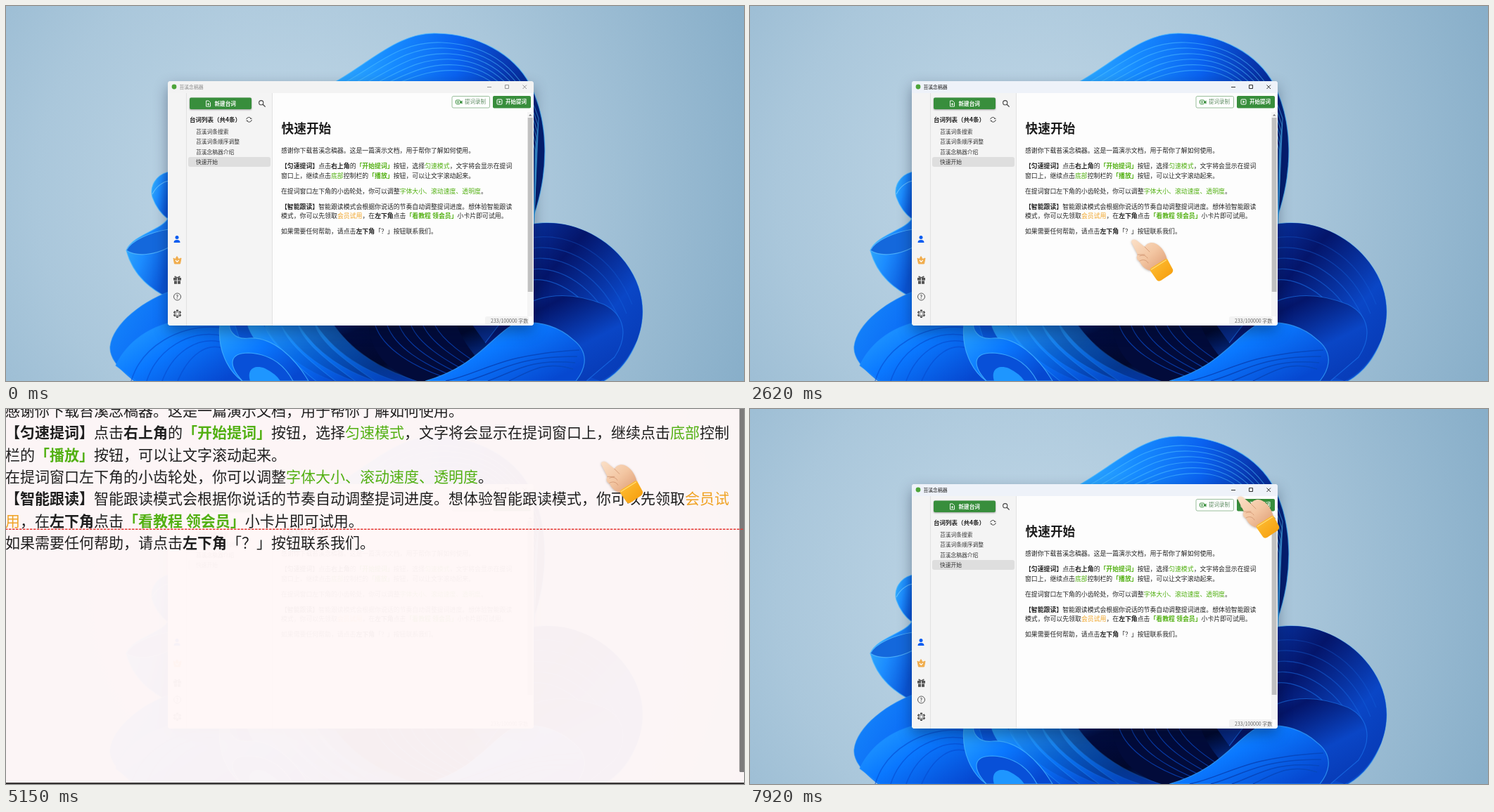
Animation, 1049 px wide and 534 px high, one loop 8000 ms. Source, as an HTML page:

```html
<!DOCTYPE html>
<html lang="zh-CN">
<head>
<meta charset="utf-8">
<title>念稿演示</title>
<style>
html, body { margin: 0; width: 100%; height: 100%; overflow: hidden; background: #a9c5d9; }
svg { display: block; }
text { font-family: "Noto Sans CJK SC", "Noto Sans CJK", "Noto Sans", sans-serif; text-spacing-trim: space-all; }
.b { font-weight: 700; }
.g { fill: #52b012; }
.G { fill: #52b012; font-weight: 700; }
.o { fill: #f0a324; }
.line { fill: none; stroke: #555; stroke-width: 1; }
</style>
</head>
<body>
<svg id="stage" width="1049" height="534" viewBox="0 0 1049 534"></svg>
<script>
const LOOP = 8000;
const GREEN = '#388e3c';

// ---------- drawing helpers ----------
const rect = (x, y, w, h, fill, more = '') =>
  `<rect x="${x}" y="${y}" width="${w}" height="${h}" fill="${fill}" ${more}/>`;
const path = (d, fill, more = '') => `<path d="${d}" fill="${fill}" ${more}/>`;
const line = (d, color = '#555', width = 1, more = '') =>
  path(d, 'none', `stroke="${color}" stroke-width="${width}" ${more}`);
const circle = (x, y, r, fill, more = '') => `<circle cx="${x}" cy="${y}" r="${r}" fill="${fill}" ${more}/>`;
const group = (id, body, more = '') => `<g id="${id}" ${more}>${body}</g>`;
const at = (x, y, body) => `<g transform="translate(${x} ${y})">${body}</g>`;

// y is the middle of the glyphs; b<..> g<..> G<..> o<..> mark styled runs
function text(x, y, size, str, fill = '#222', more = '') {
  const runs = str.replace(/([bgGo])<([^>]*)>/g, '<tspan class="$1">$2</tspan>');
  return `<text x="${x}" y="${y + size * .38}" font-size="${size}" fill="${fill}" ${more}>${runs}</text>`;
}
function grad(id, x2, y2, ...colors) {
  const stops = colors.map((c, i) =>
    `<stop offset="${i / (colors.length - 1)}" stop-color="${c}"/>`).join('');
  return `<linearGradient id="${id}" x1="0" y1="0" x2="${x2}" y2="${y2}">${stops}</linearGradient>`;
}
const repeat = (n, fn) => Array.from({ length: n }, (_, i) => fn(i)).join('');

// ---------- backdrop: soft blue ribbons ----------
const defs = `<defs>
  <radialGradient id="sky" gradientUnits="userSpaceOnUse" cx="400" cy="270" r="720">
    <stop offset="0" stop-color="#c3d9e8"/><stop offset=".5" stop-color="#aac7db"/><stop offset="1" stop-color="#86adc8"/>
  </radialGradient>
  ${grad('top', 1, .45, '#3cbcff', '#168aff', '#0a62f0', '#0836ae', '#051e70')}
  ${grad('leaf', 1, .6, '#38b4f8', '#1c8cff', '#0a56d8')}
  ${grad('base', 1, .2, '#1d9cff', '#0a68f5', '#0846c0', '#06206e', '#0a48c8')}
  ${grad('lobe', 1, 1, '#0a3fb8', '#04156a', '#0a46c6', '#0636b0')}
  ${grad('band', 1, .7, '#2aa6ff', '#0a78ff', '#0648d0')}
  ${grad('deep', 1, .6, '#0648c8', '#020c40', '#01082c', '#0538a8')}
  ${grad('skin', 1, 1, '#fbe0c8', '#f3c6a2', '#dc9870')}
  ${grad('cuff', 1, 1, '#ffc23a', '#f59a08')}
  <clipPath id="inner"><rect x="239" y="109" width="508" height="343"/></clipPath>
  <clipPath id="frame"><rect x="230" y="107" width="520" height="348" rx="4"/></clipPath>
</defs>`;

const rim = (c = '#49b9ff', o = .7) => `stroke="${c}" stroke-opacity="${o}" stroke-width="1.2"`;

const backdrop = rect(0, 0, 1049, 534, 'url(#sky)')
  + path('M468 108C520 78 560 37 612 39C670 40 722 68 745 112C772 165 772 235 750 300L480 320Z', 'url(#top)', rim())
  + repeat(6, i => path(`M${476 + 15 * i} 112C${525 + 11 * i} ${86 + 3 * i} ${560 + 9 * i} ${49 + 8 * i} ${620 + 5 * i} ${52 + 8 * i}`
      + `C690 ${55 + 8 * i} 735 ${92 + 9 * i} ${757 - i} ${160 + 9 * i}L750 320L480 320Z`, 'url(#top)', rim('#4fc0ff', .55)))
  + path('M231 236C212 241 204 258 208 272C214 289 224 299 231 304Z', 'url(#leaf)', rim())
  + path('M208 268C214 256 224 250 231 249', 'none', rim('#7ccfff'))
  + path('M231 300C226 318 180 325 171 348C181 386 208 404 231 416Z', 'url(#leaf)', rim())
  + path('M171 348C186 358 212 354 231 344V318C205 322 178 334 171 348Z', '#1468dc', rim('#62c4ff'))
  + path('M182 534C158 515 147 500 148 485C152 452 196 418 240 404L740 312C795 300 850 325 880 365C908 402 910 442 897 476C886 505 868 524 850 534Z', 'url(#base)', rim('#2b94f5', .6))
  + path('M745 312C795 300 850 325 880 365C908 402 910 442 897 476C880 512 860 526 845 534L700 480Z', 'url(#lobe)')
  + repeat(5, i => line(`M748 ${330 + 15 * i}C${800 - 5 * i} ${322 + 16 * i} ${862 - 8 * i} ${352 + 15 * i} ${890 - 8 * i} ${425 + 13 * i}`, '#1768e0', 1.3, `opacity="${.3 + .09 * i}"`))
  + path('M700 455C745 405 800 405 850 425C880 440 885 470 865 500L825 534H640Z', 'url(#lobe)', rim('#1d78f0', .6))
  + path('M156 512C175 470 230 430 325 452L350 534H185Z', 'url(#band)', rim('#1c8fff', .5))
  + repeat(4, i => line(`M${178 + 22 * i} 534C${192 + 22 * i} ${486 + 5 * i} ${245 + 14 * i} ${452 + 6 * i} ${306 + 5 * i} ${458 + 12 * i}`, '#064bd0', 1.5, 'opacity=".6"'))
  + path('M370 450H660L720 534H400Z', 'url(#deep)')
  + repeat(5, i => path(`M${365 + 25 * i} 453C${390 + 26 * i} 495 ${425 + 28 * i} 520 ${470 + 30 * i} 536H${415 + 28 * i}C${385 + 26 * i} 510 ${350 + 24 * i} 480 ${343 + 24 * i} 453Z`, 'url(#band)', rim('#2fa0ff', .45) + ` opacity="${1 - .12 * i}"`))
  + path('M515 453C518 495 545 522 585 534H700C670 505 650 480 640 453Z', '#020b3a')
  + repeat(6, i => line(`M${525 + 17 * i} 455C${535 + 17 * i} ${485 - 2 * i} ${575 + 14 * i} ${515 - 4 * i} ${640 + 14 * i} 534`, '#0a48c4', 1.2, 'opacity=".75"'))
  + path('M596 534C668 514 690 470 722 453C760 445 790 460 806 475C828 492 826 514 810 534Z', 'url(#band)', rim('#3aa8ff', .7))
  + repeat(4, i => line(`M${625 + 30 * i} 534C${680 + 22 * i} ${522 - i} ${700 + 22 * i} ${496 + 3 * i} ${815 - 3 * i} ${490 + 9 * i}`, '#0648c0', 1.5))
  + path('M304 453C300 490 316 520 336 534H430C410 500 378 470 345 473C322 476 316 458 318 453Z', 'url(#band)', rim('#45b4ff', .8))
  + path('M336 534C316 512 316 494 345 494C380 496 398 515 408 534Z', '#0850d8', rim('#45b4ff', .8))
  + path('M347 534C342 518 352 510 368 516Q384 524 390 534Z', '#1e96ff');

// ---------- main window ----------
const gear = (x, y, r, color, hole) => at(x, y,
  repeat(6, i => `<rect x="${-r * .25}" y="${-r}" width="${r * .5}" height="${2 * r}" fill="${color}" transform="rotate(${i * 60})"/>`)
  + circle(0, 0, r * .74, color) + circle(0, 0, r * .36, hole));

const titleBar = (bg, ink, id) => group(id,
  path('M230 124V111Q230 107 234 107H746Q750 107 750 111V124Z', bg)
  + circle(239, 115, 3.4, '#4ea53a')
  + text(246.5, 115, 6.8, '苔溪念稿器', ink)
  + line('M684 115.500H690M709.500 112.500h5v5h-5zM734.500 112.500l5.500 5.500m0-5.500l-5.500 5.500', ink, .9));

const sideIcons = circle(243, 329.500, 2.500, '#0b5cf0') + path('M238.500 337Q238.500 333 243 333T247.500 337Z', '#0b5cf0')
  + path('M238 359L240.500 360.500L243 356.500L245.500 360.500L249 359L247.500 367H239.500Z', '#f0ad4e', 'stroke="#f0ad4e" stroke-linejoin="round"')
  + line('M241 362l2.300 2.300l2.300-2.300', '#fff', 1.2)
  + rect(238, 387, 11, 3.6, '#555') + rect(239, 391.400, 9, 4.400, '#555')
  + line('M243.500 387v9', '#f3f3f3') + line('M243.500 387c-5-4-4-1-2-.3m2 .3c5-4 4-1 2-.3', '#555', 1.1)
  + circle(243.500, 414, 5, 'none', 'stroke="#555"') + text(241.600, 414, 7, '?', '#555', 'class="b"')
  + gear(243.500, 438.300, 5.600, '#555', '#f3f3f3') + circle(243.500, 438.300, 3.100, 'none', 'stroke="#f3f3f3" stroke-width=".9"');

const names = ['苔溪词条搜索', '苔溪词条顺序调整', '苔溪念稿器介绍', '快速开始'];
const article = [
  [206, '感谢你下载苔溪念稿器。这是一篇演示文档，用于帮你了解如何使用。'],
  [228, 'b<【匀速提词】>点击b<右上角>的G<「开始提词」>按钮，选择g<匀速模式>，文字将会显示在提词'],
  [241.300, '窗口上，继续点击g<底部>控制栏的G<「播放」>按钮，可以让文字滚动起来。'],
  [263.500, '在提词窗口左下角的小齿轮处，你可以调整g<字体大小、滚动速度、透明度>。'],
  [285.500, 'b<【智能跟读】>智能跟读模式会根据你说话的节奏自动调整提词进度。想体验智能跟读'],
  [298.800, '模式，你可以先领取o<会员试用>，在b<左下角>点击G<「看教程 领会员」>小卡片即可试用。'],
  [321, '如果需要任何帮助，请点击b<左下角>「？」按钮联系我们。']
];

const mainWindow =
  rect(230, 107, 520, 348, '#f3f3f3', 'rx="4" style="filter:drop-shadow(0 8px 10px rgba(0,10,40,.38))"')
  + `<g clip-path="url(#frame)">`
  + rect(230, 124, 148, 331, '#f4f4f4') + rect(378, 124, 372, 331, '#fdfdfd')
  + line('M256.500 124V455M378.500 124V455', '#e2e2e2')
  + '</g>'
  + titleBar('#f3f3f3', '#8a8a8a', 'idle') + titleBar('#eef2f9', '#1a1a1a', 'active')
  + sideIcons
  + rect(261, 130.500, 88, 16.500, GREEN, 'rx="2" style="filter:drop-shadow(0 1px 1px rgba(0,0,0,.35))"')
  + line('M284.500 135h3.500l2.500 2.500v5.500h-6zM287.500 138v3.600M285.700 139.800h3.600', '#fff', .9)
  + text(296.500, 138.700, 7.600, '新建台词', '#fff', 'class="b"')
  + circle(362.700, 137.700, 3.100, 'none', 'stroke="#444" stroke-width="1.1"') + line('M365 140l3.600 3.600', '#444', 1.3)
  + text(261, 161.500, 8.500, '台词列表（共4条）', '#222', 'class="b"')
  + line('M341.700 161.500a3.600 3.600 0 0 1 6.500-1.500M349.300 162a3.600 3.600 0 0 1-6.500 1.700M347 160.300h2.500M344 163.500h-2.500', '#444', 1)
  + rect(259, 215, 117, 14, '#dedede', 'rx="3"')
  + names.map((s, i) => text(270, 179 + 14.300 * i, 7.750, s, '#333')).join('')
  + rect(634, 128.500, 53.500, 16.500, '#fff', 'rx="2" stroke="#8fb891" stroke-width=".9"')
  + rect(639.500, 134, 6, 5.500, 'none', `stroke="${GREEN}" rx="1"`) + path('M646 136l2.500-1.500v5l-2.500-1.500z', GREEN) + circle(642.500, 136.800, 1.200, GREEN)
  + text(652, 136.500, 7.500, '提词录制', '#5c8b60')
  + rect(692, 128, 54, 17.500, GREEN, 'rx="2"')
  + rect(698, 133, 7, 7, 'none', 'stroke="#fff" rx="1"') + path('M700.500 134.500l3 2l-3 2z', '#fff')
  + text(710, 136.500, 7.500, '开始提词', '#fff', 'class="b"')
  + rect(741, 151, 8, 291, '#f5f5f5') + path('M743 156.500l2.200-2.500l2.200 2.500z', '#777') + rect(741.700, 159, 7, 248, '#c1c1c1')
  + text(391.500, 174.500, 17.700, '快速开始', '#1c1c1c', 'class="b"')
  + article.map(([y, s]) => text(391, y, 8.900, s)).join('')
  + rect(681, 442, 62, 12, '#f3f3f3', 'rx="3"')
  + text(689, 448, 7, '233/100000 字数', '#666');

const dialog =
  group('dim', path('M230 124H750V451Q750 455 746 455H234Q230 455 230 451Z', '#000', 'fill-opacity=".44"'))
  + group('card', rect(401, 216, 178, 147, '#f8f8f8', 'rx="2" style="filter:drop-shadow(0 5px 9px rgba(0,0,0,.45))"')
    + text(414, 233, 11.100, '选择提词方式', '#333')
    + rect(410, 274.500, 13, 13, '#666', 'rx="2"') + text(411.800, 281, 8, 'AI', '#fff', 'class="b"')
    + text(440, 269, 9, '自动跟读台词')
    + text(440, 281, 7.280, '智能识别当前读到的位置，台词自动滑动', '#777')
    + text(440, 292.500, 7.280, '剩余时长：不限量', '#777')
    + path('M413 339a6 6 0 1 1 7 0q-3.500 1.800-7 0z', '#666') + line('M416 336.500l3.500-4M412 335h1M414 331.500l.7.7', '#f8f8f8', 1.100)
    + text(440, 328, 9, '匀速滚动')
    + text(440, 340, 7.280, '台词将匀速向下滑动，可以手动调节速度', '#777'));

// ---------- prompter ----------
const PITCH = 31.420;
function prompter(x, y, w, h, thumbEnd, lines) {
  const bottom = y + h, right = x + w;
  return rect(x, y, w, h, '#fff7f7', 'fill-opacity=".967"')
    + lines.map((s, i) => text(x + 5, y + 19.800 + PITCH * i, 21, s, '#1e1e1e')).join('')
    + rect(right - 9.500, y + 2, 9, thumbEnd - y - 2, '#7c7b7b', 'rx="1.500"')
    + line(`M${x} ${y + h / 3}H${right}`, '#e53935', 1.500, 'stroke-dasharray="3.500 1.500"')
    + rect(x, bottom - 18, w, 18, '#262424', 'fill-opacity=".93"');
}
const lead = '感谢你下载苔溪念稿器。这是一篇演示文档，用于帮';
const small = `<g clip-path="url(#inner)">` + prompter(239, 109, 507.500, 343, 291.500, [
  lead,
  '你了解如何使用。',
  'b<【匀速提词】>点击b<右上角>的G<「开始提词」>按钮，选择',
  'g<匀速模式>，文字将会显示在提词窗口上，继续点击g<底>',
  'g<部>控制栏的G<「播放」>按钮，可以让文字滚动起来。',
  '在提词窗口左下角的小齿轮处，你可以调整g<字体大>',
  'g<小、滚动速度、透明度>。',
  'b<【智能跟读】>智能跟读模式会根据你说话的节奏自动',
  '调整提词进度。想体验智能跟读模式，你可以先领取',
  'o<会员试用>，在b<左下角>点击G<「看教程 领会员」>小卡片即',
  '可试用。'
]) + '</g>'
  + rect(239, 109, 507, 2, '#1f4a2a')
  + rect(480, 111, 26, 9, '#777') + line('M484 113.500h18M484 115.500h18M484 117.500h18', '#bbb', .8)
  + line('M688 126.500h8M723.500 120l6.500 6.500m0-6.500l-6.500 6.500', '#e53935', 1.100)
  + line('M706 122v-2.500h2.500M711.500 119.500h2.500v2.500M714 125v2.500h-2.500M708.500 127.500h-2.500v-2.500', '#e08a80', 1)
  + gear(257, 443, 5.500, '#fff', '#302e2e')
  + circle(440, 443, 5.300, '#fff') + line('M437.700 441.500a2.800 2.800 0 1 0 2.300-1.300M437 439.500l.5 2.300l2.300-.5', '#302e2e', 1.100)
  + path('M472 440h1.300v6h-1.300zM478.500 440v6l-4.500-3zM548.500 440h-1.300v6h1.300zM542 440v6l4.500-3z', '#fff')
  + circle(510.500, 443, 5.500, '#fff') + path('M509 440.500l4 2.500l-4 2.500z', '#302e2e')
  + line('M723.500 440h1.500m1.500 0h7M723.500 443h1.500m1.500 0h7M723.500 446h1.500m1.500 0h7', '#fff', 1.200)
  + line('M739 451l7-7M743 451l3-3', '#fff', 1);

const large = prompter(-6, -18, 1058, 568, 517, [
  lead + '你了解如何使用。',
  'b<【匀速提词】>点击b<右上角>的G<「开始提词」>按钮，选择g<匀速模式>，文字将会显示在提词窗口上，继续点击g<底部>控制',
  '栏的G<「播放」>按钮，可以让文字滚动起来。',
  '在提词窗口左下角的小齿轮处，你可以调整g<字体大小、滚动速度、透明度>。',
  'b<【智能跟读】>智能跟读模式会根据你说话的节奏自动调整提词进度。想体验智能跟读模式，你可以先领取o<会员试>',
  'o<用>，在b<左下角>点击G<「看教程 领会员」>小卡片即可试用。',
  '如果需要任何帮助，请点击b<左下角>「？」按钮联系我们。'
]);

// ---------- pointing hand ----------
const hand = group('tap', circle(6, -3, 7, '#fbd92b', 'fill-opacity=".9"'))
  + path('M1 4C1 0 6-.500 9 2L20 11C23 5 31 3 37 7C45 12 50 20 52 30L31 45C23 45 16 39 13 32C8 29 8 25 10 22Z', 'url(#skin)', 'style="filter:drop-shadow(0 1px 1.500px rgba(60,30,10,.3))"')
  + line('M20 11L27 18M13 24C17 22 22 23 24 27M13 31C18 28 23 30 25 34M10 22L20 22', '#c98a66', .9, 'stroke-linecap="round" opacity=".75"')
  + path('M29 41L49 28.500Q52 27 53 30L60 43Q61 46 58 49L43 59Q39 61 37 58L28 45Q27 42.500 29 41Z', 'url(#cuff)')
  + line('M29 43.500L51 29.500', '#ffdc7a', 1.200);

document.getElementById('stage').innerHTML = defs + backdrop + mainWindow + dialog
  + group('small', small) + group('large', large) + group('hand', hand);

// ---------- timeline ----------
const TICK = 132.4, START = 224;
// tick, x, y
const moves = [
  [0, 892, 346], [6, 687, 128], [7, 687, 128], [8, 759, 162], [10, 864, 189], [11, 864, 202],
  [16, 410, 338], [17, 410, 338], [18, 541, 332], [19, 539, 332], [20, 539, 339], [21, 539, 339],
  [26, 694, 189], [32, 709, 121], [33, 704, 127], [34, 709, 124], [35, 709, 124], [36, 740, 117],
  [39, 976, 21], [40, 987, 11], [43, 1008, -1], [47, 1008, -1], [48, 990, 4], [52, 701, 126],
  [53, 681, 123], [54, 686, 125], [55, 686, 125], [56, 692, 127], [57, 692, 124], [60, 692, 124]
];
const taps = [7, 17, 33, 56];

function handAt(n) {
  const i = Math.max(1, moves.findIndex(m => m[0] >= n));
  const [n0, x0, y0] = moves[i - 1], [n1, x1, y1] = moves[i];
  const p = Math.max(0, (n - n0) / (n1 - n0));
  const e = n1 - n0 > 2 ? p * (1.5 - .5 * p) : p;
  return [x0 + (x1 - x0) * e, y0 + (y1 - y0) * e];
}
// half-shown for the first and the last tick
const fade = (n, from, to) => n < from || n > to ? 0 : n === from || n === to ? .5 : 1;

const parts = {};
for (const id of ['active', 'dim', 'card', 'small', 'large', 'hand', 'tap']) parts[id] = document.getElementById(id);
const show = (id, opacity) => { parts[id].style.opacity = opacity; };

function draw(time) {
  const n = Math.floor((time % LOOP - START) / TICK);
  const max = n >= 34 && n <= 46;
  show('active', n >= 7 ? 1 : 0);
  show('dim', fade(n, 7, 17));
  show('card', fade(n, 7, 17));
  show('small', max ? 0 : fade(n, 21, 57));
  show('large', max ? 1 : 0);
  show('hand', n >= 0 ? 1 : 0);
  show('tap', taps.includes(n) ? 1 : 0);
  parts.hand.setAttribute('transform', `translate(${handAt(n).join(' ')})`);
}

const begin = performance.now();
function loop() {
  draw(performance.now() - begin);
  requestAnimationFrame(loop);
}
loop();
</script>
</body>
</html>
```
